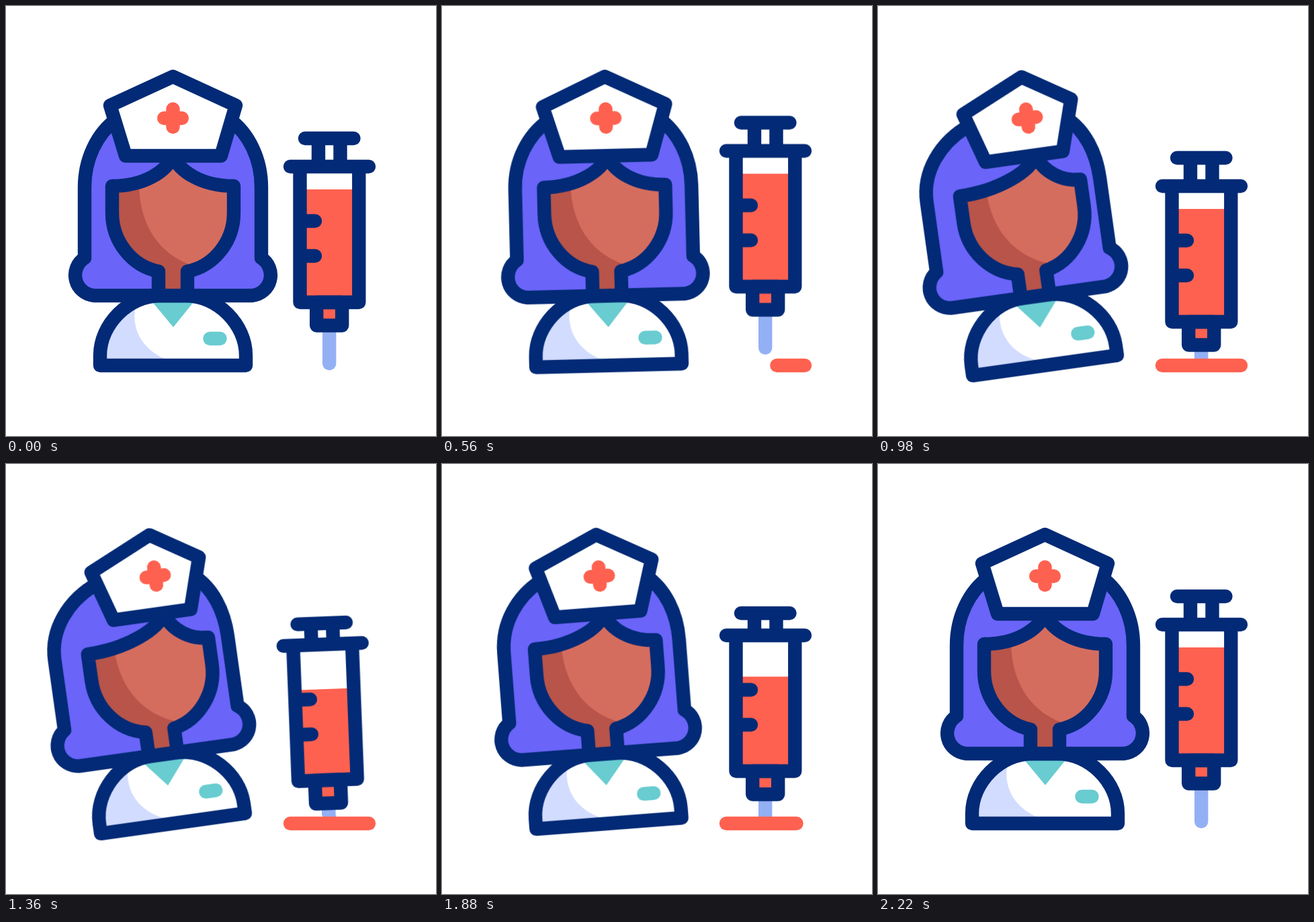
An HTML page for the animation above (2400 ms loop, 640x640 px).

```html
<!DOCTYPE html>
<html lang="en">
<head>
<meta charset="utf-8">
<title>Nurse and syringe</title>
<style>
  :root {
    --ink: #032a76;
    --red: #ff6150;
    --teal: #68ccd0;
    --needle: #93b0f5;
  }
  html, body { margin: 0; width: 100%; height: 100%; overflow: hidden; background: #fff; }
  svg { display: block; width: 100vw; height: 100vh; }

  .ink { stroke: var(--ink); }
  .ink, .stroke { stroke-width: 20.4; stroke-linecap: round; stroke-linejoin: round; }
  .none { fill: none; }

  /* One 2.4 s clock; every segment eases in and out. */
  .anim {
    animation: var(--move) 2.4s cubic-bezier(.333, 0, .667, 1) infinite;
  }

  /* Nurse: leans and turns from 400 to 1000 ms, returns from 1600 to 2200 ms */
  #nurse { --move: lean; transform-origin: 248.5px 535px; }
  #cross { --move: slide; }
  .morph { --move: morph; d: var(--a); }

  #hair {
    --a: path("M165 168 C135 190 117 228 117 270 L117 375 A30.5 30.5 0 0 0 131 431 L366 431 A30.5 30.5 0 0 0 380 375 L380 270 C380 228 362 190 332 168 Z");
    --b: path("M179 169 C142 186 108 222 108 270 L108 375 A30.5 30.5 0 0 0 122 431 L354 431 A30.5 30.5 0 0 0 368 375 L368 270 C368 232 356 196 330 174 Z");
  }
  .face {
    --a: path("M248.5 223 C239 246 206 268 158 268 L158 308 C158 350 187 387 227 395 L227 431 L270 431 L270 395 C310 387 339 350 339 308 L339 268 C291 268 258 246 248.5 223 Z");
    --b: path("M278 223 C269 246 215 268 158 268 L158 308 C158 350 187 387 227 395 L227 431 L270 431 L270 395 C310 387 339 350 339 308 L339 268 C313 268 286 250 278 223 Z");
  }
  #glow {
    --a: path("M198 264 C198 330 232 371 277 386 C315 372 339 345 339 308 L339 268 C291 268 258 246 248.5 223 C240 245 225 258 198 264 Z");
    --b: path("M198 266 C198 330 232 371 277 386 C315 372 339 345 339 308 L339 268 C313 268 286 250 278 223 C270 248 240 262 198 266 Z");
  }
  #cap {
    --a: path("M248.5 105 L342 148 L320 223 L178 223 L155 148 Z");
    --b: path("M273.5 105 L342 148 L319 223 L203 223 L180 148 Z");
  }

  @keyframes lean {
    0%, 16.667%, 91.667%, 100% { transform: rotate(0deg); }
    41.667%, 66.667% { transform: rotate(-8deg); }
  }
  @keyframes slide {
    0%, 16.667%, 91.667%, 100% { transform: translateX(0); }
    41.667%, 66.667% { transform: translateX(25px); }
  }
  @keyframes morph {
    0%, 16.667%, 91.667%, 100% { d: var(--a); }
    41.667%, 66.667% { d: var(--b); }
  }

  /* Syringe: lifts, stabs, wobbles while emptying, then pulls out and refills */
  #wobble { --move: wobble; transform-origin: 481px 535px; }
  #stab { --move: stab; }
  #plunger { --move: push; }
  #fluid { --move: drain; transform-origin: 481px 441px; }

  @keyframes wobble {
    0%, 41.667% { transform: rotate(0deg); }
    50% { transform: rotate(5deg); }
    58.333% { transform: rotate(-3deg); }
    66.667%, 100% { transform: rotate(0deg); }
  }
  @keyframes stab {
    0%, 8.333%, 91.667%, 100% { transform: translateY(0); }
    25% { transform: translateY(-24px); }
    41.667%, 66.667% { transform: translateY(29.4px); }
  }
  @keyframes push {
    0%, 41.667%, 91.667%, 100% { transform: translateY(0); }
    66.667% { transform: translateY(16.3px); }
  }
  @keyframes drain {
    0%, 41.667%, 91.667%, 100% { transform: scaleY(1); }
    66.667% { transform: scaleY(.702); }
  }

  /* Skin line: drawn right to left, then wiped the same way round */
  #show { animation: show 2.4s step-end infinite; }
  #skin { --move: draw; }
  @keyframes show {
    0%, 91.667% { visibility: hidden; }
    16.7% { visibility: visible; }
  }
  @keyframes draw {
    0%, 16.667% { d: path("M540 535 L540 535"); }
    33.333%, 75% { d: path("M540 535 L423 535"); }
    91.667%, 100% { d: path("M423 535 L423 535"); }
  }
</style>
</head>
<body>
<svg viewBox="0 0 640 640">
  <clipPath id="above"><rect width="640" height="543"/></clipPath>

  <g id="nurse" class="anim">
    <path fill="#fff" d="M140 535V520C140 474 182 431 230 431H267C315 431 357 474 357 520V535Z"/>
    <path fill="#d2dcff" d="M194 440C184 480 202 511 240 527V535H140V520C140 485 163 453 194 440Z"/>
    <path fill="var(--teal)" d="M210 431H287L249 478Z"/>
    <path class="stroke" stroke="var(--teal)" d="M303.500 495H318.500"/>
    <path class="ink none" d="M140 535V520C140 474 182 431 230 431H267C315 431 357 474 357 520V535Z"/>

    <path id="hair" class="anim morph ink" fill="#6a64f9"/>
    <path class="anim morph face" fill="#b85449"/>
    <path id="glow" class="anim morph" fill="#d56d5f"/>
    <path class="anim morph face ink none"/>
    <path id="cap" class="anim morph ink" fill="#fff"/>
    <path id="cross" class="anim stroke" stroke="var(--red)" d="M235.200 167H261.800M248.500 153.500V180"/>
  </g>

  <g clip-path="url(#above)">
    <g id="wobble" class="anim">
      <g id="stab" class="anim">
        <path class="stroke" stroke="var(--needle)" d="M481.200 470V532"/>
        <path id="plunger" class="anim ink none" d="M445 197H517.500M465 197V239M497.500 197V239"/>
        <rect x="437" y="239" width="88" height="202" fill="#fff"/>
        <rect id="fluid" class="anim" x="437" y="273" width="88" height="168" fill="var(--red)"/>
        <rect class="ink" x="462.200" y="441" width="38" height="34.500" fill="var(--red)"/>
        <path class="ink none" d="M437.500 239V441H525.300V239M423 239H540M437.500 320H460M437.500 372H460"/>
      </g>
    </g>
  </g>

  <g id="show"><path id="skin" class="anim stroke" stroke="var(--red)"/></g>
</svg>
</body>
</html>
```
